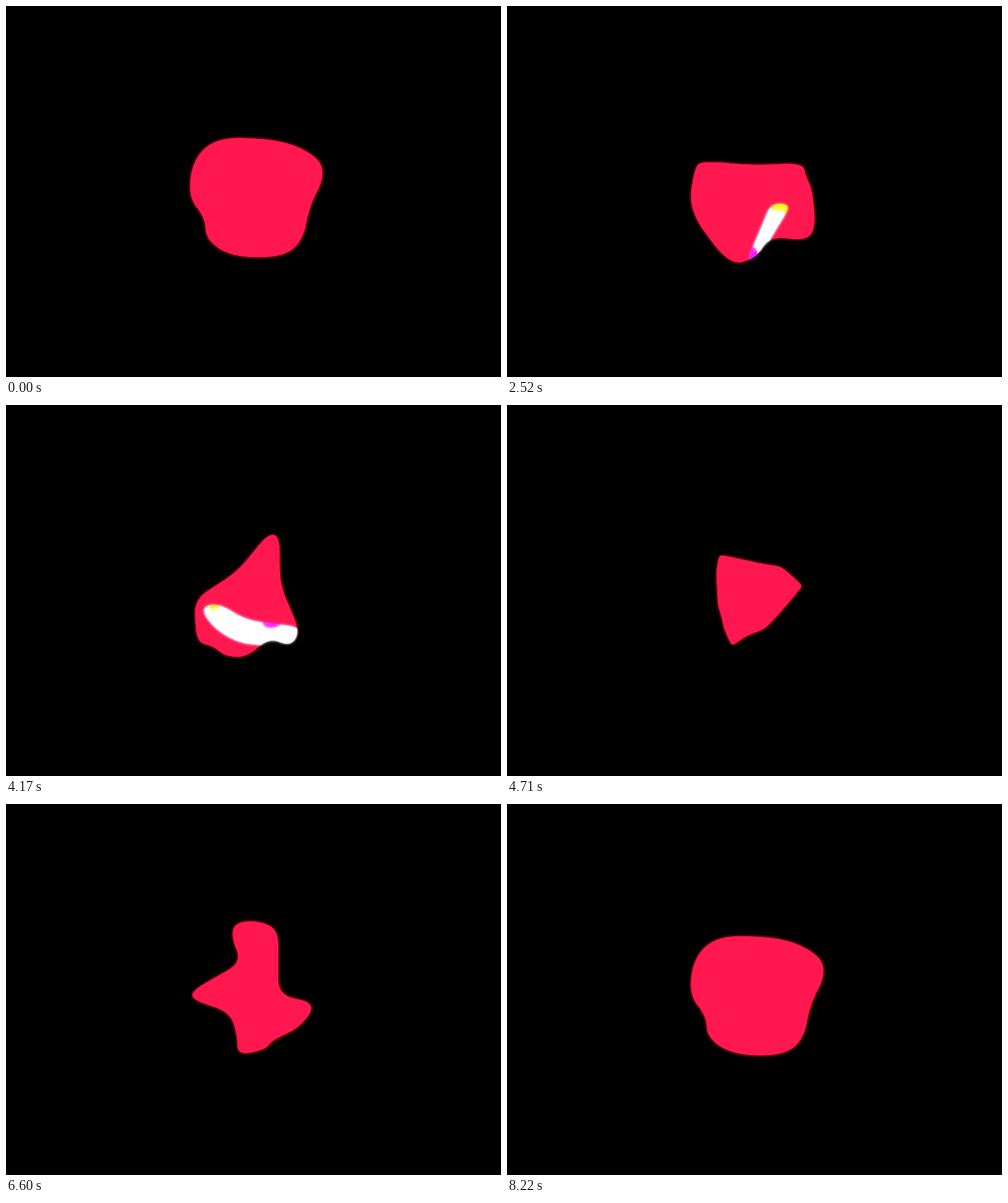
An HTML page with a canvas that plays this animation: 800x600 px, repeating every 8.25 s.

```html
<!DOCTYPE html>
<html>
<head>
<meta charset="utf-8">
<style>
html, body { margin: 0; height: 100%; background: #000; overflow: hidden }
canvas { display: block }
</style>
</head>
<body>
<canvas id="stage" width="800" height="600"></canvas>
<script>
const LOOP = 8250, N = 240, TAU = 2 * Math.PI;
const ctx = document.getElementById('stage').getContext('2d');
const layer = Object.assign(document.createElement('canvas'), { width: 800, height: 600 });
const g = layer.getContext('2d');

const clamp = v => Math.max(0, Math.min(1, v));
const smooth = v => v * v * (3 - 2 * v);
const mix = (a, b, u) => [a[0] + (b[0] - a[0]) * u, a[1] + (b[1] - a[1]) * u];
const gap = (a, b) => Math.hypot(b[0] - a[0], b[1] - a[1]);

// Polygon given as x,y pairs; each corner is rounded off from at most `cut` pixels away.
function rounded(cut, ...flat) {
  const n = flat.length / 2, out = [];
  const at = i => flat.slice((i + n) % n * 2, (i + n) % n * 2 + 2);
  for (let i = 0; i < n; i++) {
    const v = at(i);
    const [a, b] = [at(i - 1), at(i + 1)].map(w => mix(v, w, Math.min(0.5, cut / gap(v, w))));
    for (let u = 0; u <= 1; u += 1 / 16) out.push(mix(mix(a, v, u), mix(v, b, u), u));
  }
  return out;
}

// Evenly spaced points, starting above the middle of the stage so that poses correspond.
function pose(line) {
  const out = [], pts = [...line, line[0]], dist = [0];
  for (let i = 1; i < pts.length; i++) dist.push(dist[i - 1] + gap(pts[i - 1], pts[i]));
  for (let i = 0, j = 1; i < N; i++) {
    const d = dist[dist.length - 1] * i / N;
    while (dist[j] < d) j++;
    out.push(mix(pts[j - 1], pts[j], (d - dist[j - 1]) / (dist[j] - dist[j - 1])));
  }
  const off = ([x, y]) => Math.abs(x - 400) + (y > 300 ? 999 : 0);
  const first = out.reduce((best, p, i) => off(p) < off(out[best]) ? i : best, 0);
  return [...out.slice(first), ...out.slice(0, first)];
}

function blob(x, y, rx, ry) {
  return pose(Array.from({ length: N }, (_, i) => {
    const a = TAU * i / N, k = 1 + 0.03 * Math.sin(3 * a);
    return [x + rx * k * Math.cos(a), y + ry * k * Math.sin(a)];
  }));
}

const pot = pose(rounded(45, 345,211, 450,217, 506,245, 515,277, 490,325, 480,380, 446,407,
  365,406, 323,378, 322,343, 294,308, 303,245));
const fruit = pose(rounded(45, 300,272, 386,262, 391,257, 415,201, 438,205, 464,198, 456,227,
  507,302, 508,366, 488,380, 440,388, 402,416, 353,414, 294,327, 297,290));
const bowl = pose(rounded(45, 315,250, 400,258, 478,253, 483,275, 494,298, 499,362, 480,380,
  425,372, 402,408, 360,420, 293,330, 303,262));
const sail = pose(rounded(25, 374,269, 424,208, 442,212, 443,290, 475,366, 460,391, 425,376,
  390,408, 355,407, 335,390, 308,384, 304,315));
const boot = pose(rounded(25, 370,192, 405,188, 440,202, 440,308, 502,323, 475,362, 430,382,
  420,397, 374,407, 374,375, 362,337, 300,316, 302,301, 381,256, 364,215));
const triangle = pose(rounded(8, ...[0, 1, 2].flatMap(i => {
  const a = (100.5 + 120 * i) * TAU / 360;
  return [396 + 93 * Math.cos(a), 304 + 93 * Math.sin(a)];
})));
const tall = blob(401, 311, 103, 112), wide = blob(399, 296, 112, 111);

const keys = [[0, pot], [840, pot], [1380, fruit], [1740, bowl], [2520, bowl], [3060, tall], [3480, tall],
  [4170, sail], [4980, triangle], [5880, triangle], [6600, boot], [7060, wide], [7640, pot], [LOOP, pot]];

// The triangle turns slowly about its centre.
function posed(shape, t) {
  if (shape !== triangle) return shape;
  const a = (5610 - t) * 0.021 * TAU / 360, c = Math.cos(a), s = Math.sin(a);
  return shape.map(([x, y]) => [396 + (x - 396) * c - (y - 304) * s, 304 + (x - 396) * s + (y - 304) * c]);
}

function outline(t) {
  const i = keys.findIndex(k => k[0] > t), [t0, from] = keys[i - 1], [t1, to] = keys[i];
  const u = (t - t0) / (t1 - t0), a = posed(from, t), b = posed(to, t);
  const sway = from === triangle && to === triangle ? 0 : 2 * Math.sin(Math.PI * u);
  return a.map((p, n) => {
    const th = n / N * TAU, w = sway * Math.sin(3 * th + 6 * u), [x, y] = mix(p, b[n], smooth(u));
    return [x + w * Math.sin(th), y - w * Math.cos(th)];
  });
}

function oval(x, y, rx, ry, color, turn = 0) {
  g.beginPath();
  g.ellipse(x, y, rx, ry, turn, 0, TAU);
  g.fillStyle = color;
  g.fill();
}
// Fills a shape, then paints more inside it.
function fill(pts, color, inside) {
  g.save();
  g.beginPath();
  pts.forEach(([x, y]) => g.lineTo(x, y));
  g.closePath();
  g.fillStyle = color;
  g.fill();
  g.clip();
  inside();
  g.restore();
}

const eyeball = rounded(12, 385,228, 430,222, 460,226, 472,240, 458,261, 385,263);
const stick = rounded(16, 427,319, 459,321, 405,412, 388,412);
const smile = rounded(25, 314,328, 343,320, 388,348, 480,360, 480,395, 375,385, 335,360);

const eye = () => fill(eyeball, '#fff', () => {
  oval(406, 246, 18, 18, '#5428ff');
  oval(407, 257, 13, 7, '#f31cff');
  oval(408, 231, 6, 4, '#d323ff');
  oval(399, 245, 6, 2, '#fff', -0.45);
});
const match = () => fill(stick, '#fff', () => {
  oval(443, 326, 16, 13, '#ffee22', 0.3);
  oval(440, 342, 14, 11, '#fff', 0.3);
  oval(397, 401, 7, 11, '#e81cff', 0.3);
});
const mouth = () => fill(smile, '#fff', () => {
  oval(336, 327, 8, 5, '#ffe52e', -0.3);
  oval(429, 354, 14, 7, '#f42bff');
});
const details = [[1380, 425, 245, eye], [2520, 422, 368, match], [4170, 400, 358, mouth]];

function draw(t) {
  g.fillStyle = '#000';
  g.fillRect(0, 0, 800, 600);
  fill(outline(t), '#ff184f', () => {
    for (const [peak, x, y, paint] of details) {
      const s = smooth(clamp((390 - Math.abs(t - peak)) / 160));
      if (!s) continue;
      g.save();
      g.translate(x, y);
      g.scale(s, s);
      g.translate(-x, -y);
      paint();
      g.restore();
    }
  });

  // Glow: a blurred, hardened copy under the sharp picture.
  ctx.globalCompositeOperation = 'source-over';
  ctx.filter = 'blur(3px) contrast(1.3)';
  ctx.drawImage(layer, 0, 0);
  ctx.filter = 'none';
  ctx.globalCompositeOperation = 'lighten';
  ctx.drawImage(layer, 0, 0);
}

const start = performance.now();
function frame() {
  draw((performance.now() - start) % LOOP);
  requestAnimationFrame(frame);
}
frame();
</script>
</body>
</html>
```
